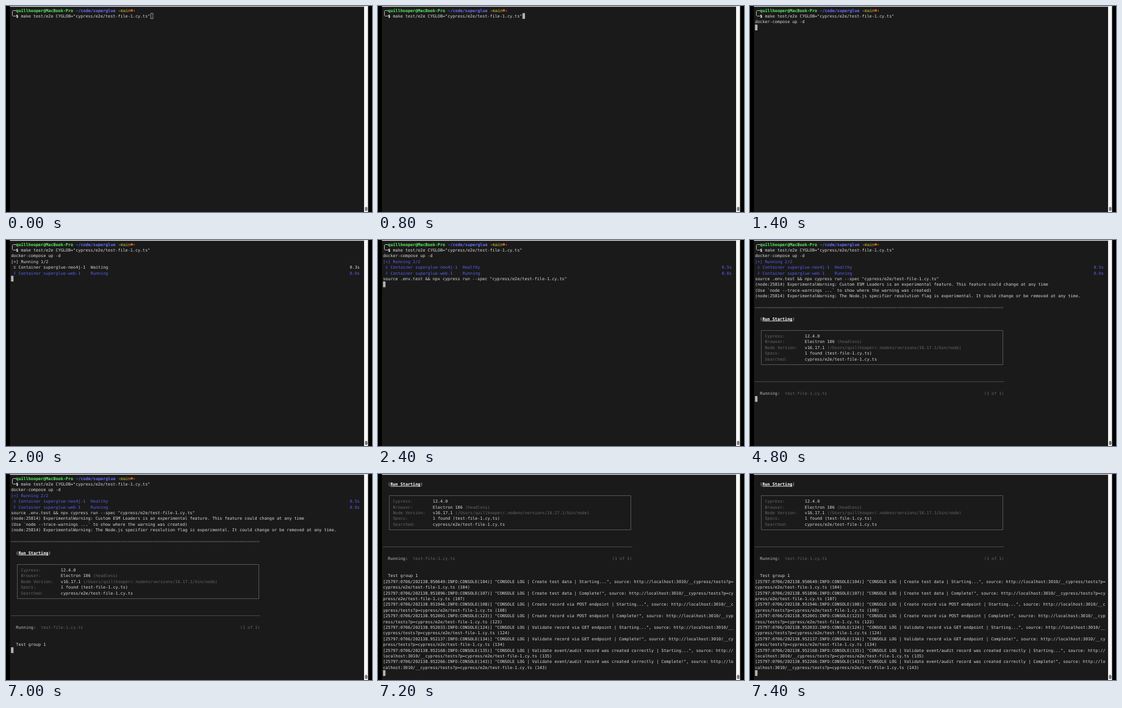
Recreate the animation shown at these times as an HTML page with a canvas. Size 600 by 338 pixels, loop 8 s.

```html
<!DOCTYPE html>
<html lang="en">
<head>
<meta charset="utf-8">
<title>Terminal test run</title>
<style>
  html, body { margin: 0; width: 100%; height: 100%; overflow: hidden; background: #000; }
  canvas { display: block; width: 600px; height: 338px; }
</style>
</head>
<body>
<canvas id="screen" width="600" height="338"></canvas>
<script>
const ctx = document.getElementById('screen').getContext('2d');

const LOOP = 8000;
const COLS = 141, ROWS = 35;
const CELL_W = 4.083, CELL_H = 9.4, LEFT = 8.2, TOP = 2.3;
const FONT = `${CELL_W / 0.602}px "DejaVu Sans Mono", monospace`;

const C = {
  bg: '#1a1a1a', text: '#dadada', white: '#fff', dim: '#666', rule: '#555',
  soft: '#bbb', green: '#5af060', blue: '#6871ff', docker: '#5a60f0',
  yellow: '#d9c838', red: '#f0522c', cursor: '#b4b4b4'
};

const USER = 'quillhooper';
const SPEC = 'cypress/e2e/test-file-1.cy.ts';

// [start, cursor row]
const CURSOR = [[0, 1], [1400, 3], [1800, 6], [2200, 7], [4000, 10], [4600, 27], [7000, 30], [7200, 46]];

const LOGS = [
  ['950649', 104, 'Create test data', 0],
  ['951896', 107, 'Create test data', 1],
  ['951946', 108, 'Create record via POST endpoint', 0],
  ['952001', 123, 'Create record via POST endpoint', 1],
  ['952033', 124, 'Validate record via GET endpoint', 0],
  ['952137', 134, 'Validate record via GET endpoint', 1],
  ['952168', 135, 'Validate event/audit record was created correctly', 0],
  ['952266', 143, 'Validate event/audit record was created correctly', 1]
].map(([stamp, line, step, done]) =>
  `[25797:0706/202138.${stamp}:INFO:CONSOLE(${line})] "CONSOLE LOG | ${step} | ` +
  `${done ? 'Complete!' : 'Starting...'}", source: http://localhost:3010/__cypress/tests?p=${SPEC} (${line})`);

let scroll = 0;
const colX = col => LEFT + col * CELL_W;
const rowY = row => TOP + (row - scroll) * CELL_H;
const midY = row => rowY(row) + CELL_H / 2;
const crisp = v => Math.floor(v) + 0.5;

function put(row, col, text, color = C.text, bold = false) {
  if (row < scroll) return;
  ctx.font = (bold ? 'bold ' : '') + FONT;
  ctx.fillStyle = color;
  ctx.fillText(text, colX(col), midY(row) + 2.5);
}

function rect(x, y, w, h, color) {
  ctx.fillStyle = color;
  ctx.fillRect(x, y, w, h);
}

function path(color, ...points) {
  ctx.strokeStyle = color;
  ctx.lineWidth = 1;
  ctx.beginPath();
  points.forEach(([x, y]) => ctx.lineTo(x, y));
  ctx.stroke();
}

function drawWindow() {
  rect(0, 0, 600, 338, '#000');
  rect(6.5, 0, 581, 338, C.bg);
  rect(587, 0, 6.5, 338, '#f6f6f6');
  rect(6.5, 0, 587, 1.2, '#e4e4e4');
  ctx.fillStyle = '#777';
  ctx.beginPath();
  ctx.roundRect(588.5, 329.5, 4, 7, 2);
  ctx.fill();
}

function drawPrompt() {
  const x = crisp(colX(0.5)), y0 = crisp(midY(0)), y1 = crisp(midY(1));
  path(C.soft, [colX(2), y0], [x + 1, y0], [x, y0 + 1], [x, y1 - 1], [x + 1, y1], [colX(2), y1]);
  put(0, 2, USER + '@MacBook-Pro', C.green, true);
  put(0, 26, '~/code/superglue', C.blue, true);
  put(0, 43, '‹main', C.yellow);
  put(0, 49, '›', C.yellow);
  ctx.fillStyle = C.red;
  ctx.beginPath();
  ctx.arc(colX(48.5), midY(0) + 0.2, 2, 0, Math.PI * 2);
  ctx.fill();
  put(1, 2, '$', C.white, true);
  put(1, 4, `make test/e2e CYGLOB="${SPEC}"`);
}

function drawContainer(row, name, state, time, color) {
  for (let i = 0; i < 6; i++) {
    rect(colX(1) + 0.6 + (i % 2) * 1.6, midY(row) - 1.8 + (i >> 1) * 1.6, 0.9, 0.9, color);
  }
  put(row, 3, 'Container superglue-' + name, color);
  put(row, 32, state, color);
  put(row, 136, time, color);
}

function drawCompose(t) {
  const ready = t >= 2200;
  const color = ready ? C.docker : C.text;
  put(3, 0, `[+] Running ${ready ? 2 : 1}/2`, color);
  drawContainer(4, 'neo4j-1', ready ? 'Healthy' : 'Waiting', ready ? '0.5s' : t < 2000 ? '0.1s' : '0.3s', color);
  drawContainer(5, 'web-1', 'Running', '0.0s', C.docker);
}

function drawWarnings() {
  const head = '(node:25814) ExperimentalWarning: ';
  put(7, 0, head + 'Custom ESM Loaders is an experimental feature. This feature could change at any time');
  put(8, 0, '(Use `node --trace-warnings ...` to show where the warning was created)');
  put(9, 0, head + 'The Node.js specifier resolution flag is experimental. It could change or be removed at any time.');
}

function drawSummary() {
  put(11, 0, '='.repeat(100), C.dim);

  put(13, 2, '(');
  put(13, 3, 'Run Starting', C.white, true);
  put(13, 15, ')');
  rect(colX(3), midY(13) + 3.4, 12 * CELL_W, 0.8, C.white);

  const x0 = crisp(colX(2.5)), x1 = crisp(colX(99.5));
  const y0 = crisp(midY(15)), y1 = crisp(midY(21));
  path(C.rule, [x0, y0], [x1, y0], [x1, y1], [x0, y1], [x0, y0 - 0.5]);

  [
    ['Cypress:', '12.4.0'],
    ['Browser:', 'Electron 106', '(headless)'],
    ['Node Version:', 'v16.17.1', `(/Users/${USER}/.nodenv/versions/16.17.1/bin/node)`],
    ['Specs:', '1 found (test-file-1.cy.ts)'],
    ['Searched:', SPEC]
  ].forEach(([label, value, note = ''], i) => {
    put(16 + i, 4, label, C.dim);
    put(16 + i, 20, value);
    put(16 + i, 21 + value.length, note, C.dim);
  });

  const y = crisp(midY(24));
  path('#484848', [colX(0), y], [colX(100), y]);
  put(26, 2, 'Running:', C.soft);
  put(26, 12, 'test-file-1.cy.ts', C.dim);
  put(26, 92, '(1 of 1)', C.dim);
}

function drawLogs() {
  let row = 30;
  for (const log of LOGS) {
    for (let i = 0; i < log.length; i += COLS) put(row++, 0, log.slice(i, i + COLS));
  }
}

function drawCursor(t, row) {
  const x = colX(t < 1400 ? 56 : 0), y = rowY(row);
  if (t < 800) {
    ctx.strokeStyle = C.cursor;
    ctx.lineWidth = 0.8;
    ctx.strokeRect(x + 0.4, y + 0.4, CELL_W - 0.4, CELL_H - 0.8);
  } else {
    rect(x, y, CELL_W, CELL_H, C.cursor);
  }
}

function draw(t) {
  const row = CURSOR.filter(([start]) => t >= start).pop()[1];
  scroll = Math.max(0, row - ROWS + 1);
  ctx.textRendering = 'geometricPrecision';
  drawWindow();
  if (!scroll) drawPrompt();
  if (t >= 1400) put(2, 0, 'docker-compose up -d');
  if (t >= 1800 && !scroll) drawCompose(t);
  if (t >= 2200) put(6, 0, `source .env.test && npx cypress run --spec "${SPEC}"`);
  if (t >= 4000) drawWarnings();
  if (t >= 4600) drawSummary();
  if (t >= 7000) put(29, 2, 'Test group 1');
  if (t >= 7200) drawLogs();
  drawCursor(t, row);
}

const start = performance.now();
function tick() {
  draw((performance.now() - start) % LOOP);
  requestAnimationFrame(tick);
}
tick();
</script>
</body>
</html>
```
